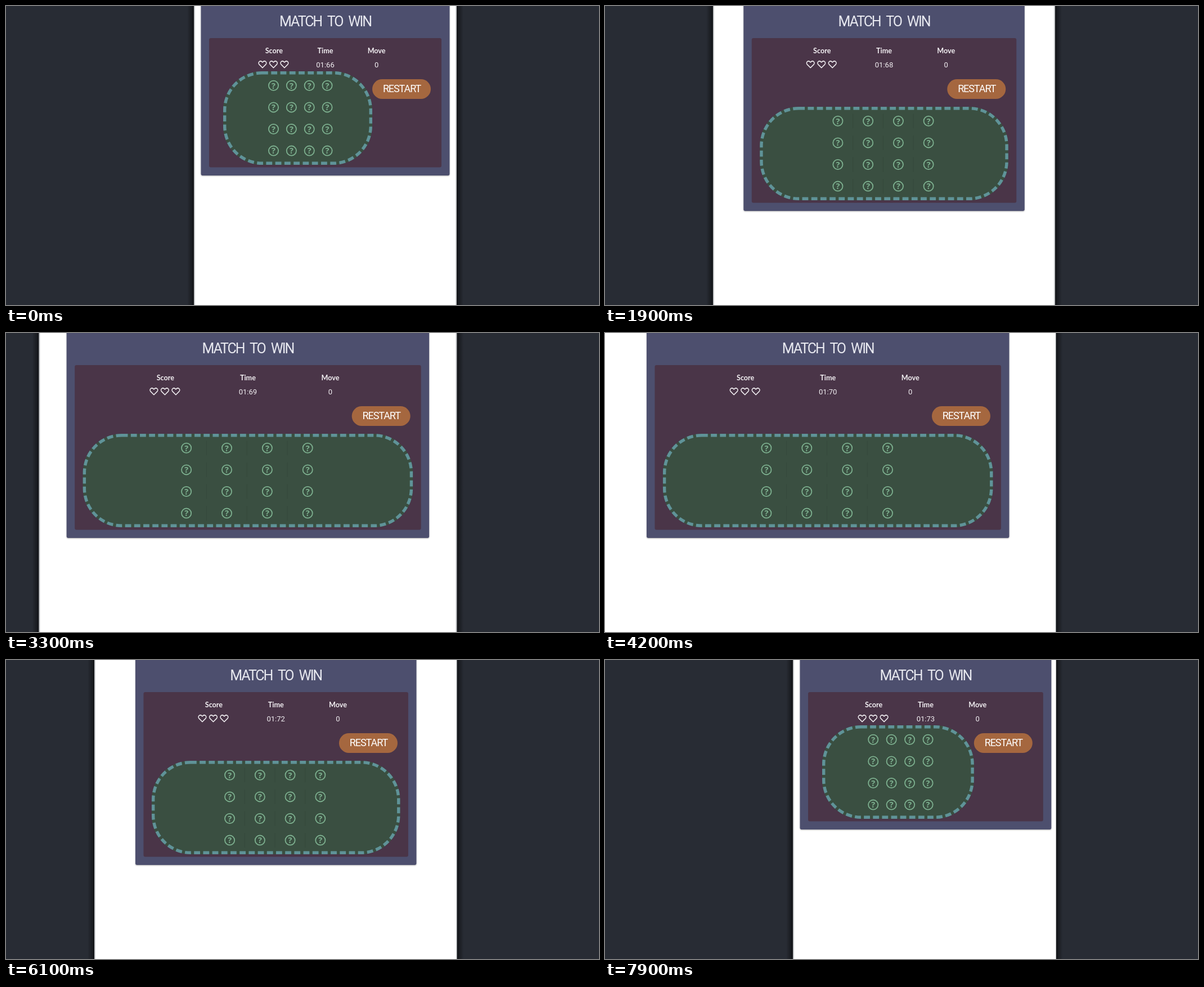
Recreate the animation shown at these times as an HTML page. Size 1054x531 px, loop 8000 ms.

```html
<!DOCTYPE html>
<html lang="en">
<head>
<meta charset="utf-8">
<title>Match to win</title>
<style>
  html, body { margin: 0; width: 100%; height: 100%; overflow: hidden; background: #282c34; }
  svg { display: block; }
  text { text-anchor: middle; fill: #f3f0f3; }
  .title { font: 400 25px Roboto, sans-serif; letter-spacing: -2.1px; word-spacing: 6px; fill: #e8e9f0; }
  .label { font: 700 12.6px Lato, sans-serif; }
  .value { font: 400 13px Roboto, sans-serif; }
  .button { font: 400 18px Roboto, sans-serif; letter-spacing: -1.1px; fill: #fff; }
  .mark { font: 700 14.5px 'Open Sans', sans-serif; fill: #7db08f; }
</style>
</head>
<body>
<svg id="stage" width="1054" height="531" viewBox="0 0 1054 531"></svg>
<script>
const stage = document.getElementById('stage');
const LOOP = 8000, EDGE = 801.5, MARGIN = 2.8;

// key poses of the dragged window: [time, left edge, right edge of the page in it]
const poses = [
  [400, 334, 798.2], [1000, 266, 796.2], [1900, 192, 797.2], [2400, 127, 794.4],
  [2600, 127, 794.4], [2800, 86, 798], [4200, -10.4, 800], [4400, -10.4, 800],
  [5400, 76, 800], [6100, 157, 799.6], [6900, 255, 801], [7900, 334, 803]
];

function poseAt(time) {
  const i = poses.findIndex(p => p[0] >= time);
  if (i <= 0) return poses[i ? poses.length - 1 : 0];
  const a = poses[i - 1], b = poses[i];
  const k = (time - a[0]) / (b[0] - a[0]);
  return a.map((v, n) => v + (b[n] - v) * k);
}

// The picture is refreshed at a pace that slows down during the loop.
function refreshTime(time) {
  const [start, pace] = time < 2400 ? [0, 100] : time < 4600 ? [2400, 200] : [4600, 254];
  const at = n => start + Math.round(n * pace / 100) * 100;
  const n = Math.floor((time - start) / pace);
  return at(n + 1) <= time ? at(n + 1) : at(n) <= time ? at(n) : at(n - 1);
}

const rect = (x, y, w, h, fill, r = 0, more = '') =>
  `<rect x="${x}" y="${y}" width="${w}" height="${h}" rx="${r}" fill="${fill}" ${more}/>`;
const text = (x, y, kind, words) => `<text x="${x}" y="${y}" class="${kind}">${words}</text>`;

const defs = `<defs>
  <linearGradient id="shade"><stop stop-color="#000" stop-opacity="0"/>
    <stop offset="1" stop-color="#000" stop-opacity=".55"/></linearGradient>
  <filter id="lift" x="-5%" width="110%"><feDropShadow dx="0" dy="1" stdDeviation="1" flood-opacity=".3"/></filter>
  <path id="heart" d="M0 6.3L-5.8 .4C-9 -3.2 -4.2 -8.3 0 -3.6C4.2 -8.3 9 -3.2 5.8 .4Z"
    fill="none" stroke="#f3f0f3" stroke-width="1.5" stroke-linejoin="round"/>
  <g id="card"><circle r="8.6" fill="none" stroke="#7db08f" stroke-width="1.8"/>${text(0, 5.2, 'mark', '?')}</g>
</defs>`;

function windowFrame(left, right) {
  const end = Math.min(right + MARGIN, EDGE);
  const white = Math.min(right + MARGIN - 2, EDGE);
  return rect(left - 12, 0, 12, 531, 'url(#shade)') +
    rect(-12, 0, 12, 531, 'url(#shade)', 0, `transform="translate(${end}) scale(-1 1)"`) +
    rect(left, 0, end - left, 531, '#c8cacc') +
    rect(left + 2, 0, white - left - 2, 531, '#fff');
}

function board(x, y, w) {
  const line = 5.4, dash = 2 * line, h = 166, r = 69, mid = r - line / 2;
  const length = 2 * (w + h - 4 * r) + 2 * Math.PI * mid;
  const gaps = Math.round((length - dash) / (3 * line));
  const gap = (length - dash) / gaps - dash;
  return rect(x, y, w, h, '#3a4f41', r) +
    rect(x + line / 2, y + line / 2, w - line, h - line, 'none', mid,
      `stroke="#5f9398" stroke-width="${line}" stroke-dasharray="${dash} ${gap}"`);
}

function cards(x, y, pitch) {
  let out = '';
  for (let row = 0; row < 4; row++) {
    for (let col = 0; col < 4; col++) {
      const cx = x + col * pitch, cy = y + row * 38.6;
      out += `<use href="#card" x="${cx}" y="${cy}"/>`;
      if (col < 3 && pitch > 35) out += rect(cx + pitch / 2 - .7, cy - 13, 1, 26, '#000', 0, 'opacity=".09"');
    }
  }
  return out;
}

function draw(time) {
  const [, left, right] = poseAt(time);
  const pageLeft = left + MARGIN, page = right - pageLeft;
  const center = (pageLeft + right) / 2;

  // The layout has three widths, chosen by the room on the page.
  const wide = page >= 530;
  const width = page >= 685 ? 644.5 : wide ? 499.5 : page - 19.4;
  const a = center - width / 2, b = center + width / 2;
  const drop = wide ? 63 : 0;

  const gap = width / 4 - (wide ? 14.6 : 19.4);
  const score = center - gap, move = center + gap;
  const seconds = 67 + Math.floor((time - 880) / 1010);

  const boardX = a + (wide ? 29 : 39.5);
  const boardW = width - (wide ? 58 : 177);
  const pitch = width / 8 - (wide ? 8.7 : 23.4);
  const firstX = wide ? center - 1.5 - 1.5 * pitch : boardX + width / 4 - 21;

  stage.innerHTML = defs + windowFrame(left, right) +
    rect(a, -10, width, 311 + drop, '#4d506e', 3, 'filter="url(#lift)"') +
    rect(a + 14.5, 57, width - 29, 229.5 + drop, '#4a3548', 3) +
    text(center, 36, 'title', 'MATCH TO WIN') +
    text(score, 83.5, 'label', 'Score') + text(center, 83.5, 'label', 'Time') + text(move, 83.5, 'label', 'Move') +
    [-1, 0, 1].map(i => `<use href="#heart" x="${score - 1 + i * 19.5}" y="103.5"/>`).join('') +
    text(center, 108.5, 'value', '01:' + seconds) + text(move, 108.5, 'value', '0') +
    board(boardX, 116 + drop, boardW) + cards(firstX, 141.3 + drop, pitch) +
    rect(b - 137.5, 130, 104, 35, '#a5673f', 17.5) +
    text(b - 85, 153, 'button', 'RESTART');
}

let shown;
function tick() {
  const time = refreshTime(performance.now() % LOOP);
  if (time !== shown) draw(shown = time);
  requestAnimationFrame(tick);
}
tick();
</script>
</body>
</html>
```
